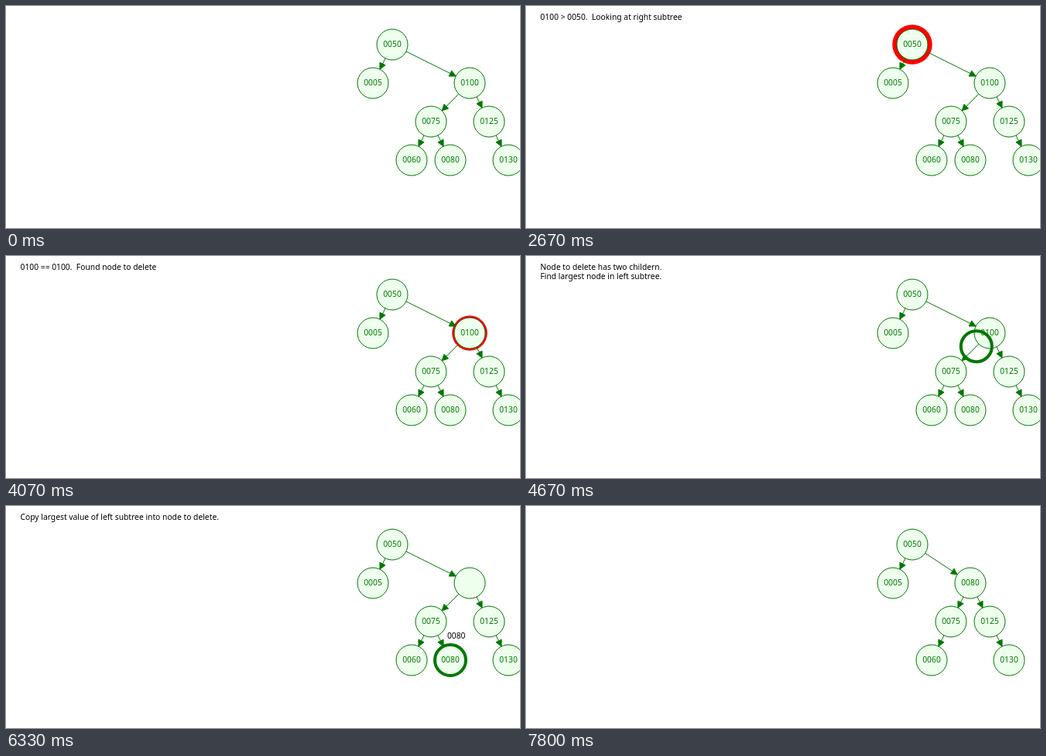
These frames come from a looping animation (664x288 px, 8910 ms). An HTML page:

```html
<!DOCTYPE html>
<html lang="en">
<head>
<meta charset="utf-8">
<title>Binary search tree: delete</title>
<style>
  html, body { margin: 0; width: 100%; height: 100%; overflow: hidden; background: #fff; }
  svg { display: block; width: 664px; height: 288px; }
  text { font: 10.3px "Noto Sans", "Open Sans", sans-serif; white-space: pre; }
  .edge { stroke: #070; fill: #070; }
  .node { stroke: #070; fill: #efe; }
  .key { fill: #070; text-anchor: middle; }
  .label { text-anchor: middle; }
  .ring { stroke: #070; stroke-width: 4; fill: none; }
  .pulse { fill: #f00; }
</style>
</head>
<body>
<svg id="stage" viewBox="0 0 664 288"></svg>
<script>
const stage = document.getElementById("stage");
const LOOP = 8910, FRAME = 100 / 3, RADIUS = 20;
const FIRST = 56, LAST = 234, STEPS = 7;
const INTRO_START = 32;

// Each node: start position, end position, parent
const tree = {
  "0050": { from: [499, 50], to: [499, 50] },
  "0005": { from: [474, 100], to: [474, 100], parent: "0050" },
  "0100": { from: [599, 100], to: [574, 100], parent: "0050" },
  "0075": { from: [549, 150], to: [549, 150], parent: "0100" },
  "0125": { from: [624, 150], to: [599, 150], parent: "0100" },
  "0060": { from: [524, 200], to: [524, 200], parent: "0075" },
  "0080": { from: [574, 200], to: [574, 200], parent: "0075" },
  "0130": { from: [649, 200], to: [624, 200], parent: "0125" }
};

const goRight = "0100 > 0050.  Looking at right subtree";
const twoChildren = "Node to delete has two childern.\nFind largest node in left subtree.";
const steps = [
  { message: goRight, pulse: "0050" },
  { message: goRight, ring: ["0050", "0100"] },
  { message: "0100 == 0100.  Found node to delete", pulse: "0100" },
  { message: twoChildren, ring: ["0100", "0075"] },
  { message: twoChildren, ring: ["0075", "0080"] },
  { message: "Copy largest value of left subtree into node to delete.",
    ring: ["0080", "0080"], copy: ["0080", "0100"] },
  { message: "Remove node whose value we copied." }
];

const lerp = (a, b, p) => a.map((v, i) => v + (b[i] - v) * p);
const between = ([a, b], p) => lerp(tree[a].from, tree[b].from, p);
const circle = (cls, [x, y], r) => `<circle class="${cls}" cx="${x}" cy="${y}" r="${r}"/>`;
const caption = (cls, [x, y], s) => `<text class="${cls}" x="${x}" y="${y + 3}">${s}</text>`;

function arrow([ax, ay], [bx, by]) {
  const d = Math.hypot(bx - ax, by - ay), ux = (bx - ax) / d, uy = (by - ay) / d;
  const along = (s, w) => `${bx - ux * s - uy * w} ${by - uy * s + ux * w}`;
  const tip = along(RADIUS, 0);
  return `<path class="edge" d="M${along(d - RADIUS, 0)}L${tip}M${tip}L${along(RADIUS + 8, 4)}L${along(RADIUS + 8, -4)}Z"/>`;
}

function message(s) {
  return s.split("\n").map((line, i) =>
    `<text x="18.5" y="${18 + 12 * i}">${line.replace(">", "&gt;")}</text>`).join("");
}

// The highlight swells and shrinks by 4 pixels in a triangle wave
function pulseRadius(frame) {
  const phase = ((frame - FIRST) / 14 + 3) % 8;
  return RADIUS + 6.5 - Math.abs(phase - 4);
}

function render(time) {
  const frame = Math.floor((time + 5) / FRAME);
  const elapsed = (frame - FIRST) * STEPS / (LAST - FIRST);
  const index = Math.floor(elapsed);
  const progress = Math.min(1, elapsed - index + STEPS / (LAST - FIRST));
  const step = steps[index] || {};
  const removed = index >= STEPS - 1;
  const shift = index >= STEPS ? 1 : removed ? progress : 0;
  const at = key => lerp(tree[key].from, tree[key].to, shift);
  const keys = Object.keys(tree).filter(key => !(removed && key === "0080"));

  let out = step.pulse ? circle("pulse", at(step.pulse), pulseRadius(frame)) : "";
  out += keys.filter(key => tree[key].parent)
    .map(key => arrow(at(tree[key].parent), at(key))).join("");
  for (const key of keys) {
    const copied = key === "0100" && removed;
    const value = copied ? "0080" : key === "0100" && step.copy ? "" : key;
    out += circle("node", at(key), RADIUS) + caption("key", at(key), value);
  }
  if (step.ring) out += circle("ring", between(step.ring, progress), RADIUS);
  if (step.copy) out += caption("label", between(step.copy, progress), "0080");

  const intro = frame >= INTRO_START && frame < FIRST ? "Deleting 0100" : "";
  stage.innerHTML = out + message(step.message || intro);
}

function tick() {
  render(performance.now() % LOOP);
  requestAnimationFrame(tick);
}
tick();
</script>
</body>
</html>
```
